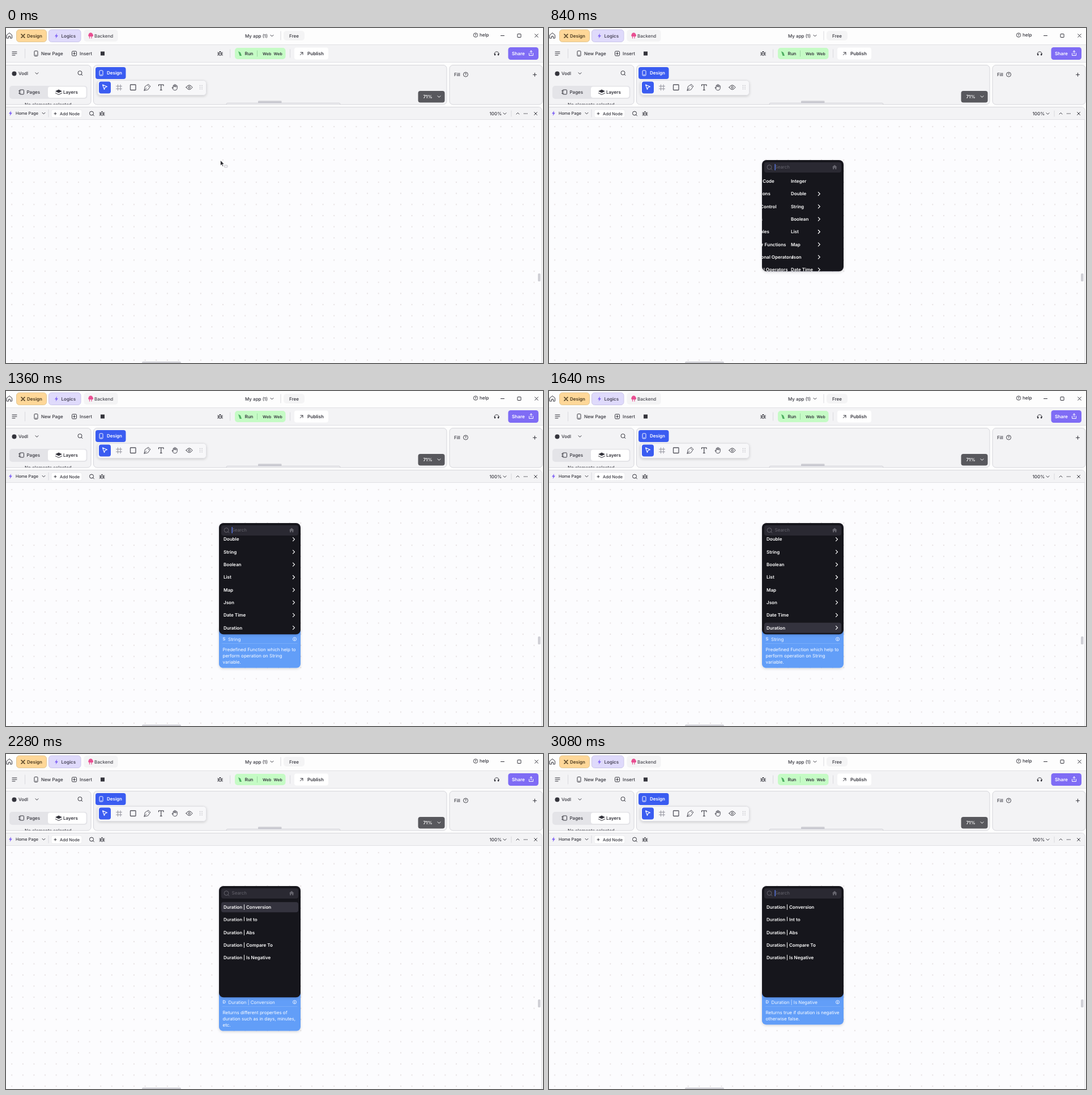
Write an HTML page that moves like this. It is 948 px wide and 591 px high and loops after 3.12 s.

```html
<!DOCTYPE html>
<html lang="en">
<head>
<meta charset="utf-8">
<title>Node menu</title>
<style>
html, body { margin: 0; width: 100%; height: 100%; overflow: hidden; background: #fdfdfd; }
svg { display: block; width: 948px; height: 591px; font-family: Inter, Roboto, sans-serif; text-rendering: geometricPrecision; }
text { white-space: pre; }
</style>
</head>
<body>
<svg id="stage" viewBox="0 0 948 591"></svg>
<script>
const INK = '#34343c', PANEL = '#f3f3f5', EDGE = '#d6d6db', BLUE = '#3a5cf1';

// Drawing helpers; text is placed by its left edge and vertical centre.
const text = (x, y, s, fill = INK, size = 8, weight = 600) =>
  `<text x="${x}" y="${y + size * .36}" fill="${fill}" font-size="${size}" font-weight="${weight}">${s}</text>`;
const box = (x, y, w, h, r, fill, stroke = 'none', more = '') =>
  `<rect x="${x}" y="${y}" width="${w}" height="${h}" rx="${r}" fill="${fill}" stroke="${stroke}" ${more}/>`;
const line = (d, stroke = INK, w = 1, fill = 'none') =>
  `<path d="${d}" stroke="${stroke}" stroke-width="${w}" fill="${fill}" stroke-linecap="round" stroke-linejoin="round"/>`;
const shape = (d, fill) => `<path d="${d}" fill="${fill}"/>`;
const ring = (x, y, r, stroke = INK, w = 1, fill = 'none') =>
  `<circle cx="${x}" cy="${y}" r="${r}" stroke="${stroke}" stroke-width="${w}" fill="${fill}"/>`;
const divider = (x, y, h) => line(`M${x} ${y}v${h}`, '#d9d9de');
const down = (x, y, c) => line(`M${x - 2.5} ${y - 1.2}l2.5 2.5l2.5 -2.5`, c);
const right = (x, y) => line(`M${x - 1.5} ${y - 3}l3 3l-3 3`, '#fff', 1.2);
const lens = (x, y, r, c = INK) => ring(x, y, r, c) + line(`M${x + r * .7} ${y + r * .7}l2 2`, c);
const plus = (x, y, r) => line(`M${x - r} ${y}h${2 * r}M${x} ${y - r}v${2 * r}`);
const bolt = (x, y) => shape(`M${x + 1} ${y - 4.5}l-4 5.3h2.5l-.8 3.8l4.3 -5.5h-2.6z`, '#8064f5');
const cross = (x, y, r) => line(`M${x - r} ${y - r}l${2 * r} ${2 * r}m0 ${-2 * r}l${-2 * r} ${2 * r}`);
const bug = (x, y) => box(x - 2.5, y - 2.5, 5, 6, 2.4, 'none', INK) +
  line(`M${x - 1.5} ${y - 3}q1.5 -2 3 0M${x - 4.5} ${y - 2}l2 1m-2 1.7h2m-2 2.6l2 -1M${x + 4.5} ${y - 2}l-2 1m2 1.7h-2m2 2.6l-2 -1M${x - 2} ${y + .5}h4`, INK, .9);
const phone = (x, y, c = INK) => box(x - 3, y - 4.5, 6, 9, 1.2, 'none', c) + line(`M${x - 1} ${y + 2.8}h2`, c, .8);
const help = (x, y, r) => ring(x, y, r, INK, .9) + text(x - 1.8, y + .1, '?', INK, 6.2);

function titleBar() {
  return line('M1.5 12.3L6 8.6L10.5 12.3V18H7.5V14.5H4.5V18H1.5Z') +
    box(18.5, 3, 53, 21.5, 5, '#fed798', '#e2c793') + line('M27 11l6 6m0 -6l-6 6', '#4a3a20', 1.6) + text(37, 14, 'Design', '#4a3a20') +
    box(75.5, 3, 56.5, 21.5, 5, '#dfdafb', '#cbc6ea') + bolt(89, 14) + text(97.5, 14, 'Logics', '#4a4658') +
    box(137.5, 3, 60, 21, 5, '#f4f4f5') +
    shape('M146 15a3 3 0 0 1 0 -4a3.6 3.6 0 0 1 7 0a2.5 2.5 0 0 1 0 4z', '#e94f92') + line('M147.5 15v3m3.5 -3v3', '#e94f92', 1.2) +
    text(156, 14, 'Backend', '#4a4a52', 8, 500) +
    text(422, 14, 'My app (1)', INK, 8, 500) + down(469.5, 13.5) + divider(485, 6, 15) +
    box(490, 5, 37, 17, 5, '#f4f4f5') + text(500, 14, 'Free', INK, 8, 500) +
    help(829, 12.5, 3.7) + text(836, 12.5, 'help', INK, 8, 500) +
    line('M873.5 13.5h6') + box(903, 10.5, 6, 6, .5, 'none', INK) + cross(936.5, 13.5, 2.8);
}

function toolbar() {
  return box(-2, 29.5, 952, 31, 0, PANEL, '#e1e1e5') +
    line('M11 42h8m-8 3h8m-8 3h5') + divider(33.5, 37, 16) +
    phone(53, 45) + text(62, 45, 'New Page', INK, 8, 500) +
    box(116.5, 41, 8, 8, 1.5, 'none', INK) + plus(120.5, 45, 2) + text(130, 45, 'Insert', INK, 8, 500) +
    box(167, 41.5, 7, 7, 0, INK) +
    bug(378, 45) + divider(395.5, 38, 14) +
    box(404, 35, 89.5, 20, 5, '#c5fbc5') + shape('M410 41l4 2.2l2 5.8h-3.5z', '#4fae62') +
    text(421.5, 45, 'Run') + line('M443.5 40v10', '#9fd6a3') +
    text(453, 45.3, 'Web', INK, 7) + text(472.5, 45.3, 'Web', INK, 7) + divider(501.5, 38, 14) +
    box(509, 34.5, 60, 21, 4, '#fff') + line('M519.5 47.5l4.5 -4.5m-4 0h4v4') + text(532, 45, 'Publish', INK, 8.1) +
    line('M862 46a4.2 4.2 0 0 1 8.4 0') + box(862, 45, 2.3, 3.5, 1, INK) + box(868, 45, 2.3, 3.5, 1, INK) +
    box(886.5, 34, 53.5, 22, 4.5, '#7f6cf5') + text(893, 45, 'Share', '#fff', 8.2) +
    line('M923.5 44.5v4h7v-4M927 46v-6m-2 2l2 -2l2 2', '#fff');
}

function panels() {
  const mute = '#55555e';
  return box(-8, 65.5, 158, 69.5, 6, PANEL, EDGE) + ring(14.5, 80.5, 4, 'none', 0, INK) +
    text(22, 80, 'Vodl', INK, 8, 500) + down(54.5, 80) + lens(130.5, 79.2, 3.5) +
    box(6, 102, 137.5, 23, 5, '#e4e4e8') + box(74, 103.5, 67.5, 19.5, 4, '#fff') +
    box(24, 109, 7.5, 8, 1.2, 'none', INK) + line('M22.5 111h3m-3 4h3') + text(36.5, 113, 'Pages', INK, 8, 500) +
    shape('M87 111.5l6 -3l6 3l-6 3zM87 114l6 3l6 -3v1l-6 3l-6 -3z', INK) + text(101, 113, 'Layers') +
    `<g clip-path="url(#cut)">${text(33, 135.5, 'No elements selected', INK, 8, 500)}</g>` +

    box(154.5, 65.5, 623.5, 69.5, 6, PANEL, EDGE) +
    box(158, 69, 53.5, 21, 4, BLUE) + phone(168, 79.5, '#fff') + text(178, 79.5, 'Design', '#fff') +
    box(161.5, 92.5, 192, 26, 5, '#f7f7f9', '#e0e0e5', 'filter="url(#soft)"') +
    box(164, 94.5, 21, 21, 4, BLUE) + line('M170.5 100l8 3.5l-3.6 1.3l-1.4 3.7z', '#fff', 1.1) +
    line('M197.5 100v10m4.500 -10v10M194.500 102.700h10m-10 4.500h10', '#92929b') +
    box(219.5, 100, 9.500, 9.500, .8, 'none', mute, 'stroke-width="1.300"') +
    line('M244 110l1.500 -7l4 -2.500l4 4l-2.500 4zM244 110l4 -4M249.500 100.500l1.500 -1.500l4 4l-1.500 1.500', mute) +
    line('M269.500 102v-2h8.500v2M273.750 100v9.500m-1.500 0h3', INK, 1.1) +
    line('M295 106v-4.500q1 -1.200 1.800 0v2.500v-4q1 -1.200 1.800 0v4v-3.500q1 -1.200 1.800 0v4v-2.500q1.200 -1 2 0v4q-.5 4 -4.400 4q-3 0 -5 -5q.8 -1.500 2 1z', mute) +
    line('M318 104.700q5.500 -8 11 0q-5.500 8 -11 0z') + ring(323.500, 104.700, 1.700) +
    [0, 1, 2].map(i => ring(342.500, 101.500 + 3 * i, .7, 'none', 0, '#a8a8b0') + ring(346, 101.500 + 3 * i, .7, 'none', 0, '#a8a8b0')).join('') +
    line('M389 134.500q0 -2 2 -2h197q2 0 2 2', '#cfcfd5') + box(445, 128.500, 41.500, 4, 1, '#cbcbd2') +
    box(727.500, 111, 47, 20.500, 4, '#58585d') + text(736.500, 121.300, '71%', '#fff') + down(764.500, 121, '#fff') +

    box(783, 65.500, 164, 69.500, 6, PANEL, EDGE) + text(791, 82, 'Fill', INK, 8, 500) + help(811.500, 82, 4) + plus(933.500, 82.300, 3);
}

function editor() {
  return box(-10, 139.500, 956, 470, 6, '#fcfcfe', EDGE) +
    shape('M0 140H940a5.500 5.500 0 0 1 5.500 5.500V161H0z', PANEL) + line('M0 161.500H945.500', '#e0e0e4') +
    bolt(8, 150.500) + text(17, 150.500, 'Home Page', INK, 7.300, 500) + down(66.500, 150.500) + divider(75, 144, 13) +
    box(80, 144, 54, 14, 3, '#fff', '#ededf0') + plus(87, 151, 2) + text(95, 151, 'Add Node', INK, 7.350, 500) +
    lens(151, 150.500, 3.500) + bug(169.500, 151) +
    text(853.500, 151, '100%', INK, 8, 500) + down(880.500, 151) + divider(892, 146, 10) +
    line('M901 152l2.500 -2.500l2.500 2.500') +
    [914.800, 917.300, 919.800].map(x => ring(x, 151, .8, 'none', 0, INK)).join('') + cross(935, 151, 2.500) +
    '<rect y="164.200" width="944" height="427" fill="url(#dots)"/>' +
    box(939, 433, 4.500, 14, 1.500, '#d0d0d6') + box(240, 588.500, 69, 6, 2, '#cfcfd5');
}

const LEFT = 376, WIDTH = 144, ROW = 22.3;
const rowY = i => 270.3 + ROW * i;

const lists = [
  ['Insert Code', 'Functions', 'Flow Control', 'Maths', 'Variables', 'Helper Functions', 'Relational Operators', 'Logical Operators'],
  ['Integer', 'Double', 'String', 'Boolean', 'List', 'Map', 'Json', 'Date Time', 'Duration'],
  ['Conversion', 'Int to', 'Abs', 'Compare To', 'Is Negative'].map(s => 'Duration | ' + s)
];

// The second entry of the last list is cut off by its own row.
const listItem = (s, i, page) => {
  const label = text(384, rowY(i), s, '#fff');
  const cut = page === 2 && i === 1 ? `<g clip-path="url(#half)">${label}</g>` : label;
  return cut + (page === 2 || page === 0 && i === 0 ? '' : right(508, rowY(i)));
};

const listMarkup = (items, page) => `<g id="page${page}">` +
  box(380, 261.3, 136, 18, 4, '#34333e', 'none', `id="hover${page}"`) +
  items.map((s, i) => listItem(s, i, page)).join('') + '</g>';

const tips = [
  ['Insert Code', 389, ['Add your own custom Dart', 'language code, with full Flutter', 'SDK support.']],
  ['String', 392, ['Predefined Function which help to', 'perform operation on String', 'variable.']],
  ['Duration | Conversion', 392.5, ['Returns different properties of', 'duration such as in days, minutes,', 'etc.']],
  ['Duration | Is Negative', 392.5, ['Returns true if duration is negative', 'otherwise false.']]
];

const tipMarkup = ([title, x, lines], i) => `<g id="tip${i}">` +
  box(LEFT, 415, WIDTH, 40 + 11.2 * lines.length, 7, '#629ef8', 'none', 'filter="url(#soft)"') +
  text(382.5, 437, title[0], '#fff', 7.5, 500) + text(x, 438, title, '#f3f8ff', 8, 400) +
  ring(509.5, 437.7, 3, '#fff', .8) + line('M509.5 436.200v.1m0 1.300v1.700', '#fff', .9) +
  line('M382 445.500H514', '#82b2fa', .7) +
  lines.map((s, n) => text(382.5, 455.7 + 11.1 * n, s, '#fff', 8, 400)).join('') + '</g>';

function menu() {
  return '<g id="menu">' + tips.map(tipMarkup).join('') +
    box(LEFT, 233, WIDTH, 196.3, 8, '#14121c', 'none', 'filter="url(#soft)"') +
    `<g clip-path="url(#list)">${lists.map(listMarkup).join('')}</g>` +
    box(380, 237, 136, 18, 4, '#2a2932') + lens(389, 245.5, 3.9, '#66656e') +
    text(398.5, 245.3, 'Search', '#65646d', 8, 400) +
    shape('M499.800 245.500l4.400 -4l4.400 4h-1.200v3.700h-2.200v-2.500h-2v2.500h-2.200v-3.700z', '#66656e') +
    box(398.500, 240, 1.300, 11, 0, '#5a7df5', 'none', 'id="caret"') + '</g>';
}

const stage = document.getElementById('stage');
stage.innerHTML = `<defs>
  <pattern id="dots" width="19.62" height="19.62" patternUnits="userSpaceOnUse" x="0.4" y="164.2">
    <circle cx="9.8" cy="9.8" r="1.150" fill="#e7e2e3"/></pattern>
  <clipPath id="cut"><rect y="100" width="150" height="34.800"/></clipPath>
  <clipPath id="half"><rect x="380" y="280" width="140" height="14.800"/></clipPath>
  <clipPath id="list"><path d="M376 256H520V421.300a8 8 0 0 1 -8 8H384a8 8 0 0 1 -8 -8z"/></clipPath>
  <filter id="soft" x="-10%" y="-20%" width="120%" height="150%">
    <feDropShadow dx="0" dy="1.500" stdDeviation="2" flood-color="#000" flood-opacity=".16"/></filter>
  </defs>` + box(0, 0, 948, 591, 0, '#fdfdfd') + titleBar() + toolbar() + panels() + editor() +
  '<g id="pointer">' + line('M378.500 233.500v9.300l2.200 -2l1.700 3.400l1.500 -.8l-1.700 -3.200h3z', '#fff', .7, '#2b2b31') +
  box(385.500, 242, 5.500, 4, 1, '#f2f2f4', '#b9b9c0', 'stroke-width=".8"') + '</g>' + menu();

const OPEN = 120, FIRST = 775, SECOND = 1851, SLIDE = 250;
const tipTimes = [[240, FIRST], [1100, SECOND], [2220, 2780], [2780, 3120]];
// Start, end, list, row
const hovers = [
  [200, 320, 0, 0], [320, FIRST, 0, 1], [1080, 1180, 1, 2], [1640, SECOND, 1, 8],
  [2200, 2420, 2, 0], [2420, 2540, 2, 1], [2540, 2660, 2, 2], [2660, 2780, 2, 3], [2780, 2980, 2, 4]
];

const get = id => document.getElementById(id);
const show = (id, on) => get(id).setAttribute('visibility', on ? 'inherit' : 'hidden');
const clamp = u => Math.min(1, Math.max(0, u));
const easeOut = u => 1 - (1 - clamp(u)) ** 4;

function render(now) {
  const t = Math.floor(now % 3120 / 40) * 40;
  const between = (a, b) => t >= a && t < b;
  const a = easeOut((t - FIRST) / SLIDE), b = easeOut((t - SECOND) / SLIDE);
  const scroll = 31 * easeOut((t - 1180) / 160);

  show('pointer', t < OPEN);
  get('menu').setAttribute('visibility', t < OPEN ? 'hidden' : 'visible');
  show('caret', (t + 250) % 520 < 260);

  const slides = [-44.5 * a, 143 * (1 - a) - 44.5 * b, 143 * (1 - b)];
  const live = [a < 1, a > 0 && b < 1, b > 0];
  slides.forEach((x, i) => {
    show('page' + i, live[i]);
    get('page' + i).setAttribute('transform', `translate(${x} ${i === 1 ? -scroll : 0})`);
    const hover = hovers.find(h => h[2] === i && between(h[0], h[1]));
    show('hover' + i, hover);
    if (hover) get('hover' + i).setAttribute('y', rowY(hover[3]) - 9);
  });
  tipTimes.forEach(([from, to], i) => show('tip' + i, between(from, to)));
}

const start = performance.now();
function tick() {
  render(performance.now() - start);
  requestAnimationFrame(tick);
}
tick();
</script>
</body>
</html>
```
